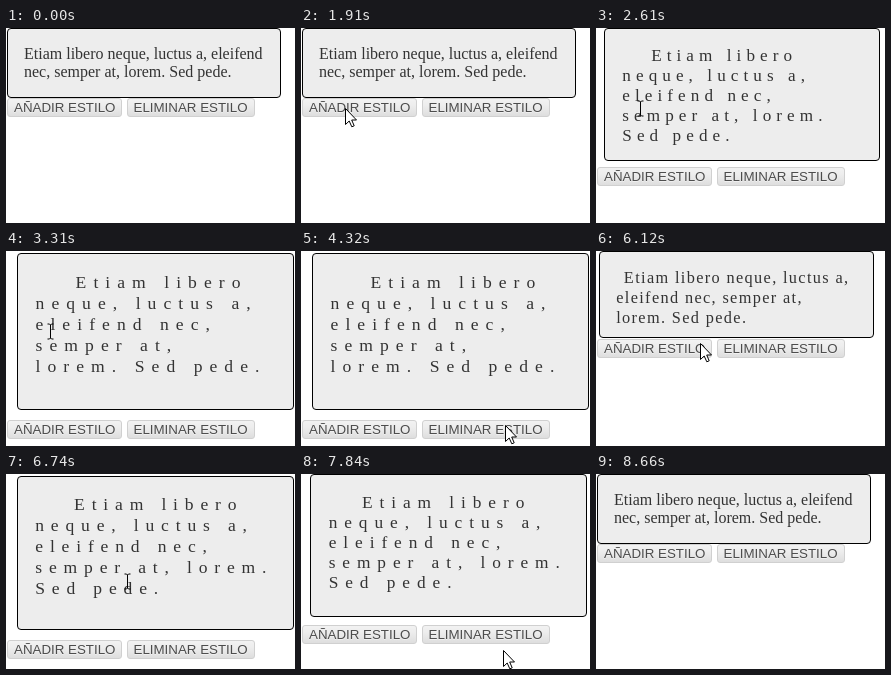
Animation, 289 px wide and 195 px high, one loop 9.86 s. Source, as an HTML page:

```html
<!DOCTYPE html>
<html lang="es">
<head>
<meta charset="utf-8">
<title>Añadir y eliminar estilo</title>
<style>
html, body { margin: 0; width: 100%; height: 100%; overflow: hidden; background: #fff; }
#box {
  position: absolute; width: 240px; padding: 1em; overflow: hidden;
  border: 1px solid #000; border-radius: 4px; background: #ededed; color: #333;
  font-family: "Liberation Serif", "Times New Roman", serif;
}
#bar { position: absolute; left: 1px; white-space: nowrap; }
#bar span {
  position: absolute; top: 0; height: 17px; padding: 0 6px; line-height: 17px;
  border: 1px solid #d0d0d0; border-radius: 3px; color: #4c4c4c;
  background: linear-gradient(#f2f2f2, #ededed 38%, #dedede);
  text-shadow: 0 1px 0 #f0f0f0;
  font-family: "Liberation Sans", Arial, sans-serif; font-size: 13.333px;
}
#bar span + span { left: 119.5px; }
svg { position: absolute; left: 0; top: 0; overflow: visible; }
</style>
</head>
<body>
<div id="box">Etiam libero neque, luctus a, eleifend nec, semper at, lorem. Sed pede.</div>
<div id="bar"><span>AÑADIR ESTILO</span><span>ELIMINAR ESTILO</span></div>
<svg id="pointer" width="12" height="20">
  <path id="arrow" d="M.5 .5V16.5L4.2 13L6.8 18.8L9.2 17.8L6.7 12H11.5Z" fill="#fff" stroke="#000"/>
  <path id="beam" d="M-3 -7.5H-1L0 -6.5L1 -7.5H3M0 -6.5V6.5M-3 7.5H-1L0 6.5L1 7.5H3" fill="none" stroke="#000"/>
</svg>
<script>
const LOOP = 9860, STEP = 100.5, DURATION = 1000;
const [box, bar, pointer, arrow, beam] =
  ["box", "bar", "pointer", "arrow", "beam"].map(id => document.getElementById(id));

// The style is added and removed in turn
const clicks = [1968, 4295, 5842, 7570];

// The pointer enters at the first place, then makes these moves
const entry = { x: 218, y: 184 };
const moves = [
  { from: 600, to: 1400, x: 44, y: 80 },
  { from: 3310, to: 4210, x: 204, y: 174 },
  { from: 4520, to: 5120, x: 80, y: 110 },
  { from: 5120, to: 5420, x: 104, y: 92 },
  { from: 6540, to: 7240, x: 202, y: 176 },
  { from: 7840, to: 8140, x: 206, y: 196 }
];

const mix = (a, b, k) => a + (b - a) * k;
const swing = k => 0.5 - Math.cos(Math.PI * Math.min(k, 1)) / 2;
const snap = t => Math.floor(t / STEP + 0.2) * STEP;

function styleAt(t) {
  const i = clicks.findLastIndex(start => start <= t);
  if (i < 0) return { p: 0, spacing: 0 };
  const k = (t - clicks[i]) / DURATION, p = swing(k);
  if (i % 2 === 0) return { p, spacing: 7.04 * p + "px" };
  // On removal the spacing stays until the end
  return { p: 1 - p, spacing: k < 1 ? "0.4em" : 0 };
}

function pointerAt(t) {
  const i = moves.findLastIndex(m => m.from <= t);
  if (i < 0 || t > moves.at(-1).to) return null;
  const a = moves[i - 1] || entry, b = moves[i];
  const k = swing((t - b.from) / (b.to - b.from));
  return [Math.round(mix(a.x, b.x, k)), Math.round(mix(a.y, b.y, k))];
}

function draw(t) {
  const { p, spacing } = styleAt(t);
  const margin = 10 * p, font = mix(16, 17.6, p), height = mix(36, 120, p);
  const top = Math.max(0, margin - 8);
  const bottom = top + height + 2 * font + 2;
  Object.assign(box.style, {
    left: 1 + margin + "px", top: top + "px", height: height + "px",
    fontSize: font + "px", textIndent: 40 * p + "px", letterSpacing: spacing
  });
  bar.style.top = Math.floor(bottom + margin) + "px";

  const at = pointerAt(t);
  pointer.style.display = at ? "" : "none";
  if (!at) return;
  const overText = at[1] < bottom;
  arrow.style.display = overText ? "none" : "";
  beam.style.display = overText ? "" : "none";
  const shift = overText ? 0.5 : 0;
  pointer.style.transform = `translate(${at[0] + shift}px, ${at[1] + shift}px)`;
}

const begin = performance.now();
function tick() {
  draw(snap((performance.now() - begin) % LOOP));
  requestAnimationFrame(tick);
}
tick();
</script>
</body>
</html>
```
